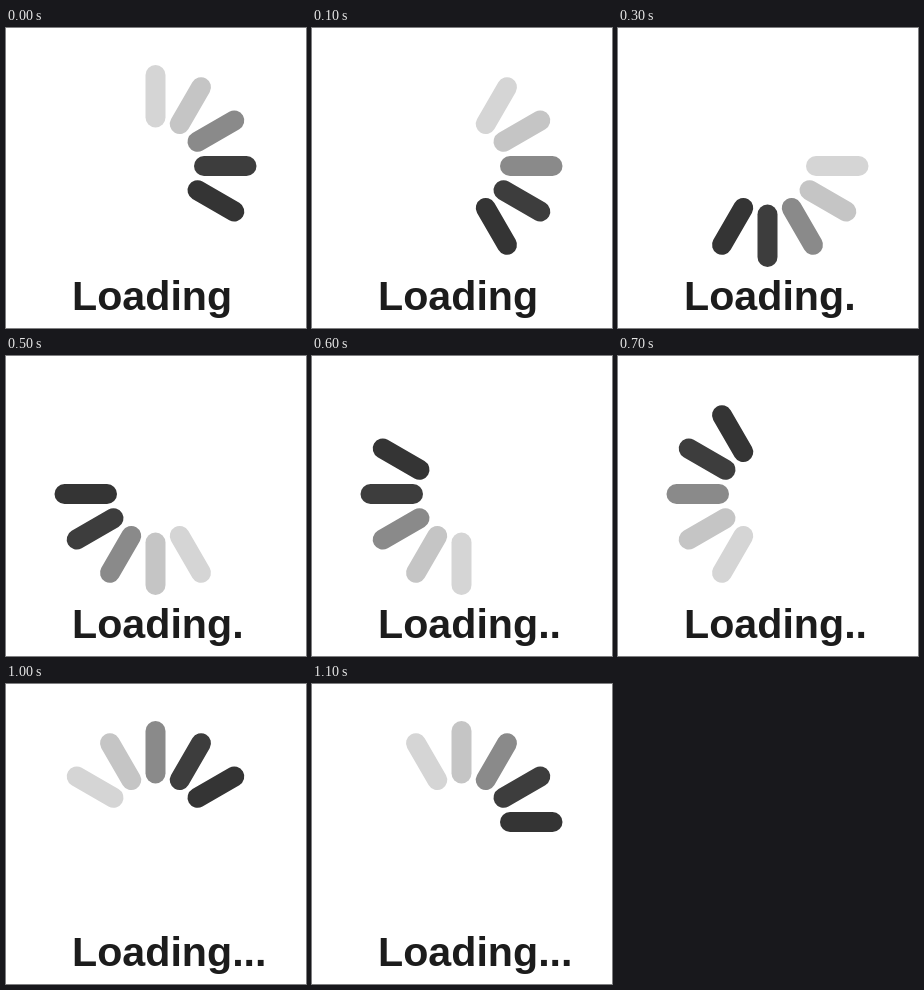
An HTML page that plays this animation: 300x300 px, repeating every 1200 ms.

```html
<!DOCTYPE html>
<html lang="en">
<head>
<meta charset="utf-8">
<title>Loading</title>
<style>
  html, body { margin: 0; width: 100%; height: 100%; overflow: hidden; background: #fff; }
  svg { display: block; width: 100vw; height: 100vh; }
  text { font: bold 41.2px "Liberation Sans", Arial, sans-serif; fill: #1c1c1c; }
</style>
</head>
<body>
<svg viewBox="0 0 300 300">
  <g id="spinner"></g>
  <text id="label" x="66" y="282">Loading</text>
</svg>
<script>
  const STEP = 100, SPOKES = 12;
  const shades = ['#d5d5d5', '#c5c5c5', '#8a8a8a', '#3d3d3d', '#343434']; // tail to head
  const spinner = document.getElementById('spinner');
  const label = document.getElementById('label');

  shades.forEach((fill, i) => {
    const bar = document.createElementNS('http://www.w3.org/2000/svg', 'rect');
    const attrs = { x: -10, y: -101, width: 20, height: 62.5, rx: 10, fill, transform: `rotate(${i * 360 / SPOKES})` };
    for (const name in attrs) bar.setAttribute(name, attrs[name]);
    spinner.append(bar);
  });

  function draw(now) {
    const step = Math.floor(now / STEP) % SPOKES;
    spinner.setAttribute('transform', `translate(149.5 138) rotate(${step * 360 / SPOKES})`);
    label.textContent = 'Loading' + '.'.repeat(Math.floor(step / 3));
  }

  const start = performance.now();
  function tick() {
    draw(performance.now() - start);
    requestAnimationFrame(tick);
  }
  tick();
</script>
</body>
</html>
```
